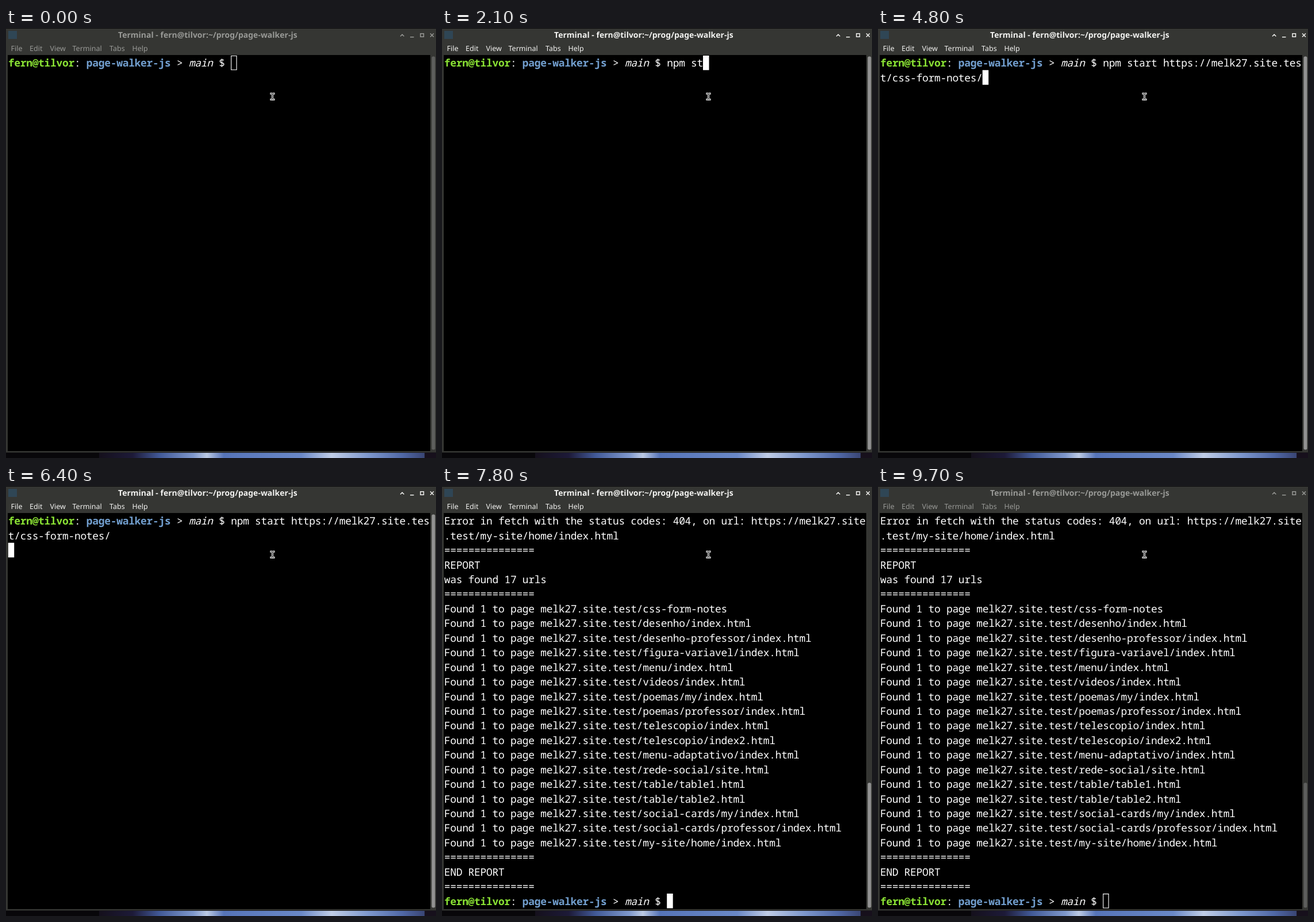
An HTML page for the animation above (9.8 s loop, 748 by 748 pixels).

```html
<!DOCTYPE html>
<html lang="en">
<head>
<meta charset="utf-8">
<title>Terminal</title>
<style>
  html, body { margin: 0; width: 100%; height: 100%; overflow: hidden; background: #000; }
  svg { display: block; width: 100vw; height: 100vh; }
  text { white-space: pre; text-rendering: geometricPrecision; }
  .mono { font: 24px "Noto Sans Mono", "DejaVu Sans Mono", monospace; letter-spacing: -0.4px; fill: #fff; }
  .title { font: bold 14px "Noto Sans", sans-serif; }
  .menu { font: 12.55px "Noto Sans", sans-serif; }
  .user { font-weight: bold; fill: #8ae234; }
  .dir { font-weight: bold; fill: #729fcf; }
  .branch { font-style: italic; }
</style>
</head>
<body>
<svg viewBox="0 0 748 748" xmlns="http://www.w3.org/2000/svg">
  <defs>
    <linearGradient id="wall" gradientUnits="userSpaceOnUse" x1="162" y1="0" x2="748" y2="0">
      <stop offset="0" stop-color="#15101c"/>
      <stop offset=".1" stop-color="#1d1a38"/>
      <stop offset=".18" stop-color="#425a98"/>
      <stop offset=".28" stop-color="#7f98cc"/>
      <stop offset=".32" stop-color="#bccae4"/>
      <stop offset=".37" stop-color="#5674b8"/>
      <stop offset=".6" stop-color="#6a88c6"/>
      <stop offset=".69" stop-color="#c0cde6"/>
      <stop offset=".8" stop-color="#7d97cc"/>
      <stop offset=".9" stop-color="#5068a6"/>
      <stop offset=".965" stop-color="#3a4675"/>
      <stop offset=".967" stop-color="#17101c"/>
      <stop offset="1" stop-color="#17101c"/>
    </linearGradient>
  </defs>
  <rect width="748" height="748" fill="#08070a"/>
  <rect x="162" y="739" width="586" height="9" fill="url(#wall)"/>
  <rect y="1" width="748" height="737.5" fill="#353633"/>
  <rect x="3" y="47" width="735" height="689" fill="#000"/>
  <rect x="4" y="5" width="15" height="14" fill="#2f4655"/>
  <g id="chrome">
    <text class="title" x="195" y="17" id="title"></text>
    <g class="menu" id="menu"></g>
    <g fill="none" stroke="currentColor" stroke-width="1.5">
      <path d="M686 14.5l3.2-3.2 3.2 3.2M703 15.7h6.5M738 9.5l6 6M744 9.5l-6 6"/>
      <rect x="721" y="9.8" width="5.5" height="5.5"/>
    </g>
  </g>
  <rect id="thumb" x="740.5" width="6" rx="2.5"/>
  <!-- The imperceptible rotation keeps fractional baselines from snapping to whole pixels. -->
  <g transform="scale(.748) rotate(.001)">
    <g class="mono" id="screen"></g>
    <rect id="cursor" stroke="#fff"/>
  </g>
  <g fill="none" stroke-linecap="square">
    <path d="M461 114.2h1.2l1.3.8 1.3-.8h1.2M463.5 115v8.5M461 124.3h1.2l1.3-.8 1.3.8h1.2" stroke="#e8e8e8" stroke-width="3.2"/>
    <path d="M461 114.2h1.2l1.3.8 1.3-.8h1.2M463.5 115v8.5M461 124.3h1.2l1.3-.8 1.3.8h1.2" stroke="#111" stroke-width="1"/>
  </g>
</svg>
<script>
const LOOP = 9800, COLS = 70, ROWS = 27;
const CELL = 14, LINE = 34, LEFT = 5, TOP = 64, ASCENT = 26;
const TRACK_TOP = 49.5, TRACK_BOTTOM = 733.5;

const USER = 'fern@tilvor', DIR = 'page-walker-js', BRANCH = 'main';
const PROMPT = `${USER}: ${DIR} > ${BRANCH} $ `;
const HOST = 'melk27.site.test', SITE = 'https://' + HOST + '/';
const ROOT = SITE + 'css-form-notes/';
const COMMAND = 'npm start ';

const PAGES = [
  'css-form-notes', 'desenho/index.html', 'desenho-professor/index.html',
  'figura-variavel/index.html', 'menu/index.html', 'videos/index.html',
  'poemas/my/index.html', 'poemas/professor/index.html',
  'telescopio/index.html', 'telescopio/index2.html',
  'menu-adaptativo/index.html', 'rede-social/site.html',
  'table/table1.html', 'table/table2.html',
  'social-cards/my/index.html', 'social-cards/professor/index.html',
  'my-site/home/index.html'
];

const TIME = { focus: 300, type: 1100, key: 200, paste: 4100, enter: 5800, header: 6700, done: 7800, blur: 9300 };
// [time, number of pages visited so far]
const VISITS = [[7100, 1], [7200, 2], [7400, 3], [7500, 4], [7600, 5], [7700, 11]];

const $ = id => document.getElementById(id);
const url = i => i ? SITE + PAGES[i] : ROOT;
const failure = i => 'Error in fetch with the status codes: 404, on url: ' + url(i);

function crawlLog(count) {
  const lines = ['Starting crawl of: ' + ROOT];
  for (let i = 0; i < count; i++) {
    if (i > 1) lines.push(failure(i - 1));
    lines.push('starting crawling: ' + url(i));
  }
  return lines;
}

function report() {
  const rule = '='.repeat(15);
  return [
    '', failure(PAGES.length - 1), rule, 'REPORT', `was found ${PAGES.length} urls`, rule,
    ...PAGES.map(page => `Found 1 to page ${HOST}/${page}`),
    rule, 'END REPORT', rule, PROMPT
  ];
}

function typed(t) {
  if (t >= TIME.paste) return COMMAND + ROOT;
  const count = Math.floor((t - TIME.type) / TIME.key) + 1;
  return COMMAND.slice(0, Math.max(0, count));
}

function linesAt(t) {
  const lines = [PROMPT + typed(t)];
  if (t >= TIME.header) lines.push('', '> page-walker@1.0.0 start', '> node main.js ' + ROOT, '');
  if (t >= TIME.done) return lines.concat(crawlLog(PAGES.length), report());
  const visit = VISITS.filter(([at]) => t >= at).pop();
  if (visit) lines.push(...crawlLog(visit[1]));
  if (t >= TIME.enter) lines.push('');
  return lines;
}

function wrap(line) {
  const rows = [];
  do {
    rows.push(line.slice(0, COLS));
    line = line.slice(COLS);
  } while (line);
  return rows;
}

function segments(row) {
  if (!row.startsWith(PROMPT)) return [[row]];
  return [[USER, 'user'], [': '], [DIR, 'dir'], [' > '], [BRANCH, 'branch'], [' $ ' + row.slice(PROMPT.length)]];
}

// Each styled run starts on its own grid column.
function rowMarkup(row, i) {
  let col = 0;
  return segments(row).map(([run, style = '']) => {
    const x = LEFT + col * CELL;
    col += run.length;
    return `<text class="${style}" x="${x}" y="${TOP + ASCENT + i * LINE}">${run.replace(/>/g, '&gt;')}</text>`;
  }).join('');
}

function setAttrs(node, attrs) {
  for (const name in attrs) node.setAttribute(name, attrs[name]);
}

let lastKey;
function draw(t) {
  const focused = t >= TIME.focus && t < TIME.blur;
  const rows = linesAt(t).flatMap(wrap);
  const key = focused + rows.join('\n');
  if (key === lastKey) return;
  lastKey = key;

  const visible = rows.slice(-ROWS);
  $('screen').innerHTML = visible.map(rowMarkup).join('');

  const last = visible.length - 1, inset = focused ? 0 : 0.75;
  setAttrs($('cursor'), {
    x: LEFT + visible[last].length * CELL + inset,
    y: TOP + last * LINE + inset,
    width: CELL - 2 * inset, height: LINE - 2 * inset,
    fill: focused ? '#fff' : 'none', 'stroke-width': 2 * inset
  });

  const height = (TRACK_BOTTOM - TRACK_TOP) * Math.min(1, ROWS / rows.length);
  setAttrs($('thumb'), { y: TRACK_BOTTOM - height, height, fill: focused ? '#929292' : '#5e5f5d' });

  const ink = focused ? '#f2f2f0' : '#989996';
  setAttrs($('chrome'), { fill: ink, color: ink });
}

$('title').textContent = `Terminal - ${USER}:~/prog/${DIR}`;
$('menu').innerHTML = Object.entries({ File: 8.5, Edit: 41, View: 76.5, Terminal: 115.5, Tabs: 180, Help: 219.5 })
  .map(([label, x]) => `<text x="${x}" y="39.5">${label}</text>`).join('');

const start = performance.now();
function tick() {
  draw((performance.now() - start) % LOOP);
  requestAnimationFrame(tick);
}
tick();
</script>
</body>
</html>
```
